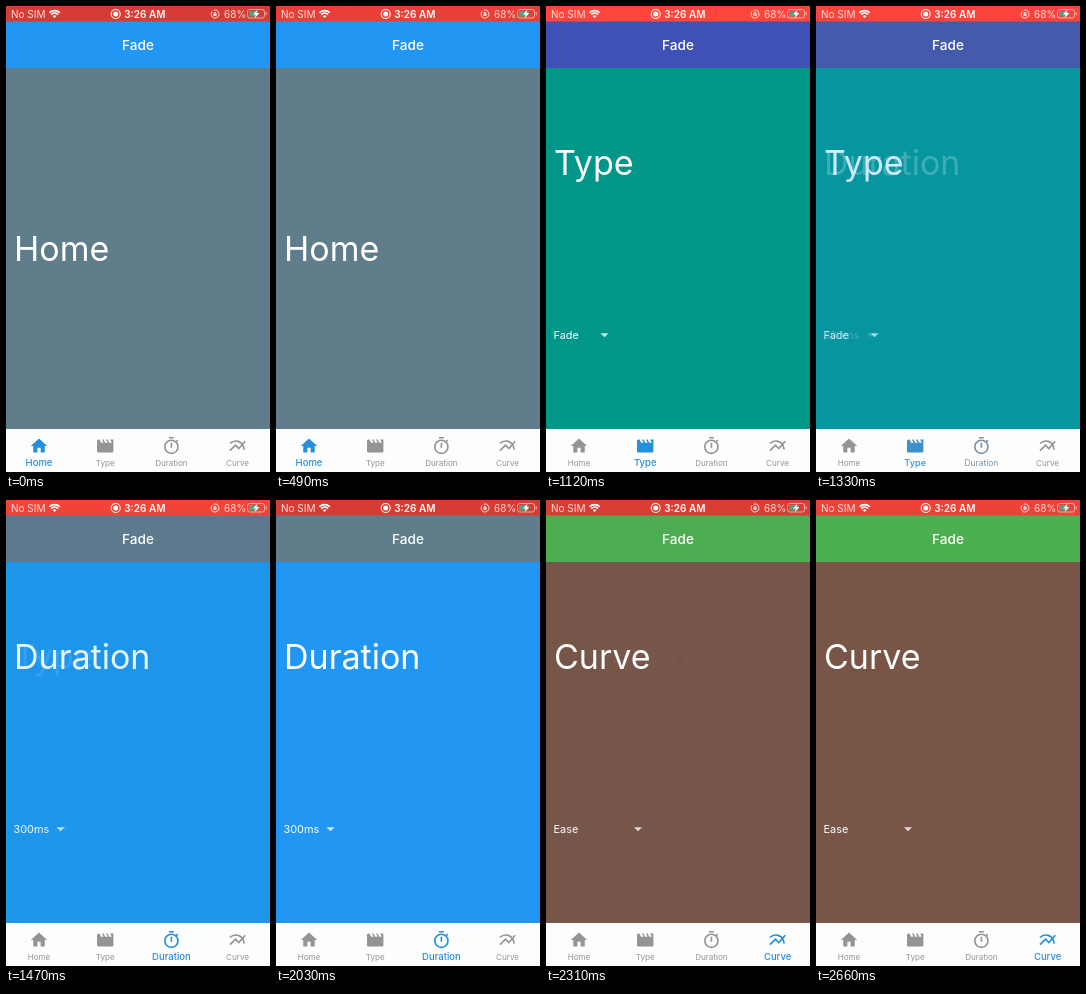
These frames come from a looping animation (264x466 px, 2.73 s). An HTML page with a canvas:

```html
<!DOCTYPE html>
<html lang="en">
<head>
<meta charset="utf-8">
<title>Fade</title>
<style>
  html, body { margin: 0; width: 100%; height: 100%; overflow: hidden; background: #fdfdfd; }
  canvas { display: block; width: 264px; height: 466px; }
</style>
</head>
<body>
<canvas id="stage"></canvas>
<script>
const W = 264, H = 466, LOOP = 2730, STEP = 70;
const BODY_TOP = 62, NAV_TOP = 423;
const canvas = document.getElementById('stage');
const ctx = canvas.getContext('2d');
const dpr = window.devicePixelRatio || 1;
canvas.width = Math.round(W * dpr);
canvas.height = Math.round(H * dpr);

const GREY = [148, 148, 150], BLUE = [36, 143, 218];
const pages = [
  { name: 'Home', start: -1000, bar: '#2196f3', body: '#607d8b', base: 255 },
  { name: 'Type', start: 510, bar: '#3f51b5', body: '#009688', base: 169, option: 'Fade', arrow: 58.5 },
  { name: 'Duration', start: 1280, bar: '#607d8b', body: '#2196f3', base: 169, option: '300ms', arrow: 54.5 },
  { name: 'Curve', start: 2050, bar: '#4caf50', body: '#795548', base: 169, option: 'Ease', arrow: 92 }
];

const clamp = v => Math.min(1, Math.max(0, v));
const mix = (a, b, p) => a + (b - a) * p;
const mixColor = (a, b, p) => `rgb(${a.map((v, i) => Math.round(mix(v, b[i], p))).join(',')})`;

function bezier(x1, y1, x2, y2) {
  const at = (a, b, s) => 3 * a * s * (1 - s) ** 2 + 3 * b * s * s * (1 - s) + s ** 3;
  return x => {
    if (x <= 0 || x >= 1) return clamp(x);
    let lo = 0, hi = 1;
    for (let i = 0; i < 20; i++) {
      const mid = (lo + hi) / 2;
      if (at(x1, x2, mid) < x) lo = mid; else hi = mid;
    }
    return at(y1, y2, lo);
  };
}
const ease = bezier(.25, .1, .25, 1);
const fastOutSlowIn = bezier(.4, 0, .2, 1);

function rect(x, y, w, h, fill) {
  ctx.fillStyle = fill;
  ctx.fillRect(x, y, w, h);
}

function text(str, x, y, size, { weight = 400, color = '#fff', align = 'left' } = {}) {
  ctx.font = `${weight} ${size}px Inter, sans-serif`;
  ctx.textAlign = align;
  ctx.fillStyle = color;
  ctx.fillText(str, x, y);
}

function polygon(points, fill) {
  ctx.fillStyle = fill;
  ctx.beginPath();
  points.forEach(([x, y]) => ctx.lineTo(x, y));
  ctx.fill();
}

function arc(x, y, r, from = 0, to = Math.PI * 2) {
  ctx.beginPath();
  ctx.arc(x, y, r, from, to);
}

// Icons are drawn in a 24 unit box.
const ICON_SCALE = .82;
const homePath = new Path2D('M10 20v-6h4v6h5v-8h3L12 3 2 12h3v8z');
const moviePath = new Path2D('M18 4l2 4h-3l-2-4h-2l2 4h-3l-2-4H8l2 4H7L5 4H4c-1.1 0-2 .9-2 2v12c0 1.1.9 2 2 2h16c1.1 0 2-.9 2-2V4z');
const timerPath = new Path2D('M9 2h6M12 8v6M17.8 6.8l2-2M20 13a8 8 0 1 1-16 0a8 8 0 1 1 16 0');
const chartPath = new Path2D('M2.7 17.7l6.8-6.7 4 4 7.8-8.8M2.7 8.7C8 4 18.5 4.5 20 16.5');
const icons = [
  () => ctx.fill(homePath),
  () => ctx.fill(moviePath),
  () => ctx.stroke(timerPath),
  () => ctx.stroke(chartPath)
];

function drawPage(page, alpha) {
  ctx.globalAlpha = alpha;
  rect(0, 0, W, BODY_TOP, page.bar);
  rect(0, BODY_TOP, W, NAV_TOP - BODY_TOP, page.body);
  text(page.name, 8, page.base, 34);
  if (page.option) {
    text(page.option, 7.5, 333, 10.9);
    const x = page.arrow;
    polygon([[x - 4, 327.2], [x + 4, 327.2], [x, 331.2]], 'rgba(255,255,255,.78)');
  }
  ctx.globalAlpha = 1;
}

function drawStatus(t) {
  const glow = (1 - Math.cos(t / 2100 * Math.PI * 2)) / 2;
  rect(0, 0, W, 15.5, mixColor([214, 60, 51], [255, 70, 59], glow));
  const soft = 'rgba(255,255,255,.82)';
  text('No SIM', 5, 11.6, 10, { color: soft });

  ctx.strokeStyle = '#fff';
  ctx.lineWidth = 1.7;
  for (const r of [4.8, 7.4]) {
    arc(48.6, 12, r, -Math.PI * .75, -Math.PI * .25);
    ctx.stroke();
  }
  ctx.fillStyle = '#fff';
  arc(48.6, 12, 2.6, -Math.PI * .75, -Math.PI * .25);
  ctx.lineTo(48.6, 12);
  ctx.fill();

  ctx.lineWidth = 1.1;
  arc(109.7, 8, 4.5);
  ctx.stroke();
  arc(109.7, 8, 2.5);
  ctx.fill();
  text('3:26 AM', 118.2, 11.6, 10, { weight: 600 });

  ctx.strokeStyle = soft;
  ctx.lineWidth = 1;
  arc(209, 8, 3.9, -1.9, 3.9);
  ctx.stroke();
  rect(207.4, 7.4, 3.2, 2.5, soft);
  arc(209, 7.4, 1.1, Math.PI, Math.PI * 2);
  ctx.stroke();
  text('68%', 218, 11.6, 10, { color: soft });

  ctx.strokeStyle = 'rgba(255,255,255,.55)';
  ctx.beginPath();
  ctx.roundRect(241.5, 3.5, 17, 8.5, 2.2);
  ctx.stroke();
  rect(259.6, 6.2, 1.2, 3, 'rgba(255,255,255,.55)');
  rect(243, 5, 9.5, 5.5, '#5b9a80');
  polygon([[251.5, 3.5], [247, 8.4], [249.7, 8.4], [248.6, 12.2], [253.2, 7], [250.4, 7]], '#fff');
}

function drawNav(t) {
  rect(0, NAV_TOP, W, H - NAV_TOP, '#fdfdfd');
  const entered = page => fastOutSlowIn(clamp((t - page.start) / 200));
  pages.forEach((page, i) => {
    const next = pages[i + 1];
    const active = entered(page) - (next ? entered(next) : 0);
    const cx = 33 + i * 66.2;
    const color = mixColor(GREY, BLUE, active);
    ctx.save();
    ctx.translate(cx, 440);
    ctx.scale(ICON_SCALE, ICON_SCALE);
    ctx.translate(-12, -12);
    ctx.fillStyle = ctx.strokeStyle = color;
    ctx.lineWidth = 2;
    icons[i]();
    ctx.restore();
    const weight = Math.round(mix(400, 500, active));
    text(page.name, cx, 459.7, mix(8.1, 9.5, active), { weight, color, align: 'center' });
  });
}

function draw(t) {
  ctx.setTransform(dpr, 0, 0, dpr, 0, 0);
  ctx.clearRect(0, 0, W, H);
  for (const page of pages) {
    const p = ease(clamp((t - page.start) / 300));
    if (p > 0) drawPage(page, p);
  }
  text('Fade', 132, 44.3, 13.6, { weight: 500, align: 'center' });
  drawStatus(t);
  drawNav(t);
}

const began = performance.now();
function tick() {
  const t = (performance.now() - began) % LOOP;
  draw(Math.floor(t / STEP) * STEP);
  requestAnimationFrame(tick);
}
tick();
</script>
</body>
</html>
```
